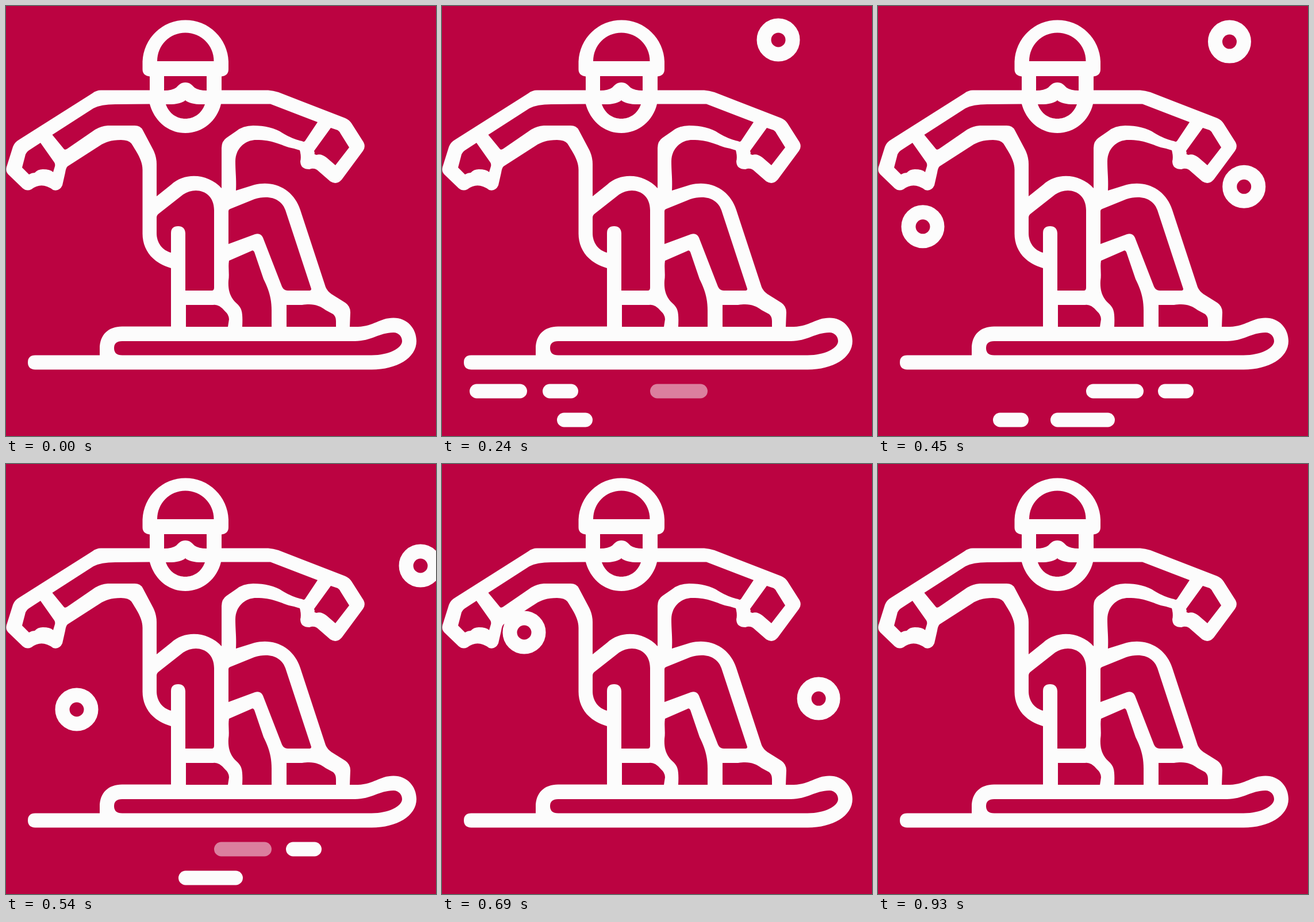
Recreate the animation shown at these times as an HTML page. Size 748 by 748 pixels, loop 1.11 s.

```html
<!DOCTYPE html>
<html lang="en">
<head>
<meta charset="utf-8">
<title>Snowboarder</title>
<style>
  html, body { margin: 0; width: 100%; height: 100%; overflow: hidden; background: #bb0341; }
  svg { display: block; width: 100%; height: 100%; }
</style>
</head>
<body>
<svg viewBox="0 0 748 748">
  <g id="rings" fill="none" stroke="#fcfcfc" stroke-width="25"></g>
  <g id="dashes" fill="#fcfcfc"></g>

  <!-- silhouette -->
  <path fill="#fcfcfc" d="M237.500 110V96.500A74.800 74.800 0 0 1 387 96.500V110Q387 121 375 122.500V146.500H456Q465 147 474 150
    L590 195Q597 198 601 204L622 237Q626 245 621 252L584 302Q575 312 564 305L541 285Q535 281 528 284
    Q512 284 512 270Q514 262 511 251Q503 248 492 246C476 241 464 233 435 233C416 233 399 248 399 270
    C399 290 401 300 400 321L432 311C468 302 501 320 512 355L556 489Q559 496 566 501L590 516
    Q599 522 599 533L598 558H612C640 557 650 542.500 674 542.500C698 542.500 714 561 714 583
    C714 612 680 632.500 636 632.500H51Q38 632 38 620Q38 607.500 51 607.500H163V596C163 572 178 557.500 202 557.500
    H287V456C255 447 237.500 424 237.500 396V285C237.500 270 230 258 218 239Q213 233 200 233
    C183 233 172 237 163 243L107 279Q104 282 103 290L98 312Q93 323 82 320Q62 305 44 319Q36 323 29 317
    L4 293Q-1 288 1 280L12 245Q15 237 22 233L150 152Q157 146.500 165 146.500H250V122.500Q237.500 121 237.500 110Z"/>

  <g fill="#bb0341">
    <!-- helmet, goggles, mouth -->
    <path d="M263 96C263 68 285 46.500 312 46.500S361.500 68 361.500 96Z"/>
    <path d="M275 122H349V147Q335 147 328 142C323 137 320 133 312 133S301 137 296 142Q289 147 275 147Z"/>
    <path d="M278 171Q303 172 312 164Q321 172 346 171C340 188 326 196 312 196S284 188 278 171Z"/>
    <!-- torso and sleeves -->
    <path d="M80.500 224L152 178Q165 171 190 171L250 170.500C258 200 282 221 312 221S367 200 374 170.500H460L542 202
      L520 235Q518 237 515 235C500 232 490 226 481 221C468 212 450 208 430 208Q412 208 400 218L384 229
      Q375 235 375 247V317C352 292 312 288 287 311L262 331V275Q262 262 256 250L238 216Q234 208 224 208H177
      Q165 209 155 215L107 248Q103 251 101 249Z"/>
    <!-- gloves -->
    <path d="M60 238L84 272Q86 275 85 279L82 289Q77 284 64 284Q55 284 50 290Q45 290 40 293Q34 287 28 281
      L33 262Q34 255 40 251Z"/>
    <path d="M565 212L577 216Q580 218 582 222L597 246L573 277L558 264Q548 256 540 259Q535 258 537 256L536 252Z"/>
    <!-- legs and the gap between them -->
    <path d="M262 368Q262 364 266 361L308 328C330 313 362 322 362 355V490Q362 495 358 495H312V395
      Q311 383 299.500 383Q287 383 287 395V429C272 425 262 412 262 395Z"/>
    <path d="M387 357Q387 354 390 353L432 336C460 327 480 337 486 355L531 492Q531 495 528 495H490
      Q483 495 480 488L447 403Q443 394 433 397L387 414Z"/>
    <path d="M388 443L427 426Q430 424 432 428L448 475C458 495 462 510 462 530V558H411
      C412 535 411 527 403 519C390 508 386 495 387 478C389 465 386 455 388 443Z"/>
    <!-- boots -->
    <path d="M313 520H360Q370 518 380 530Q388 537 388 545L386 558H313Z"/>
    <path d="M488 520H515C535 517 545 521 556 529L569 536Q574 540 574 548V558H488Z"/>
    <!-- board -->
    <path d="M202 583H607C635 583 650 568 674 568C683 568 689 575 689 583C689 595 666 607.500 636 607.500H202
      Q188 607.500 188 595Q188 583 202 583Z"/>
  </g>
</svg>
<script>
const LOOP = 1110, STEP = 30, DASH_LIFE = 300;

// Ring flight: x and y are polynomials (position, speed, curvature) in time since t0
const rings = [
  { from: 120, to: 510, t0: 300, x: [661.9, .867, -.0069], y: [122, 1.117, .0011] },
  { from: 330, to: 750, t0: 540, x: [721, .596, -.0069], y: [177, 1.3754, .0011] },
  { from: 390, to: 600, t0: 540, x: [123, .5, 0], y: [427, .48, 0] },
  { from: 660, to: 930, t0: 690, x: [143, .383, 0], y: [293, .375, 0] }
];

// Snow dashes: left, centre height, width, start
const dashes = [
  [48, 670, 100, 60], [175, 670, 62, 120], [200, 720, 62, 180],
  [362, 670, 100, 240], [487, 670, 62, 270], [300, 720, 112, 300]
];

function add(id, tag, attrs) {
  const el = document.createElementNS("http://www.w3.org/2000/svg", tag);
  for (const k in attrs) el.setAttribute(k, attrs[k]);
  return document.getElementById(id).appendChild(el);
}

for (const r of rings) r.el = add("rings", "circle", { r: 25 });
const bars = dashes.map(([x, y, width]) =>
  add("dashes", "rect", { x, y: y - 12.5, width, height: 25, rx: 12.5 }));

const poly = ([a, b, c], u) => a + b * u + c * u * u;

function dashOpacity(age) {
  if (age < 0 || age > DASH_LIFE) return 0;
  return age < STEP || age === DASH_LIFE ? .5 : 1;
}

function draw(now) {
  const t = Math.floor(now % LOOP / STEP) * STEP;
  for (const { el, from, to, t0, x, y } of rings) {
    el.setAttribute("opacity", t >= from && t < to ? 1 : 0);
    el.setAttribute("cx", poly(x, t - t0));
    el.setAttribute("cy", poly(y, t - t0));
  }
  bars.forEach((bar, i) => bar.setAttribute("opacity", dashOpacity(t - dashes[i][3])));
}

const start = performance.now();
function tick() {
  draw(performance.now() - start);
  requestAnimationFrame(tick);
}
tick();
</script>
</body>
</html>
```
